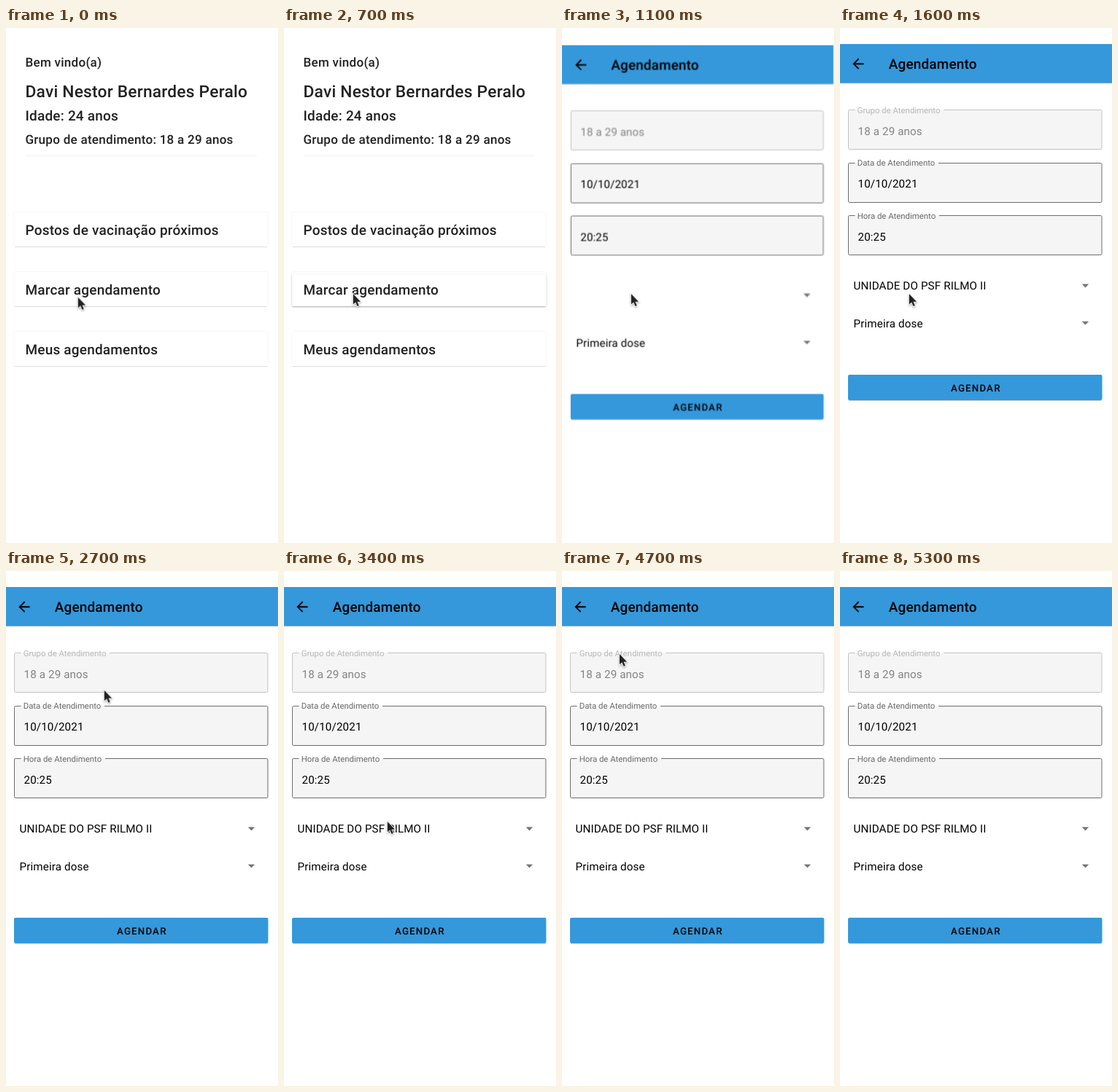
Write an HTML page that moves like this. It is 373x707 px and loops after 5.9 s.

```html
<!DOCTYPE html>
<html lang="pt">
<head>
<meta charset="utf-8">
<title>Agendamento</title>
<style>
  html, body { margin: 0; width: 100%; height: 100%; overflow: hidden; background: #fff; }
  svg { display: block; width: 373px; height: 707px; font-family: Roboto, sans-serif; text-rendering: geometricPrecision; }

  /* Every timeline shares the same loop and changes in hard steps. */
  .home, .form, .raised, .labels, .unit, .drop, .rest, .cursor { animation: 5.9s step-end infinite; }
  .home, .form { transform-origin: 185px 365px; }

  .home { fill: #222; font-weight: 500; letter-spacing: .2px; animation-name: home; }
  .t18 { font-size: 17.08px; letter-spacing: .24px; }
  .t20 { font-size: 18.98px; }
  .t24 { font-size: 22.78px; }
  .edge { fill: #fff; stroke: #f6f6f6; }
  .under { fill: none; stroke: #dedede; }
  .raised { fill: #fff; filter: drop-shadow(0 1.5px 1.5px rgba(0, 0, 0, .24)); animation-name: raised; }

  .form { font-size: 15.18px; letter-spacing: .13px; animation-name: form; }
  .bar { fill: #3498db; }
  .shade { fill: none; stroke: #000; stroke-opacity: .2; }
  .title { font-size: 18.98px; font-weight: 500; letter-spacing: .17px; }
  .box { fill: #f5f5f5; stroke: #6c6c6c; }
  .notch { stroke: #f5f5f5; stroke-width: 1.2; }
  .label { font-size: 11.39px; letter-spacing: 0; fill: #6c6c6c; }
  .off .box { stroke: #c2c2c2; }
  .off .label { fill: #b8b8b8; }
  .off .value { fill: #838383; }
  .arrow { fill: #757575; }
  .button { font-size: 13.28px; font-weight: 500; letter-spacing: 1.186px; }

  .labels { animation-name: labels; }
  .unit { animation-name: unit; }
  .drop { animation-name: drop; }
  .rest { animation-name: rest; }
  .cursor { animation-name: cursor; }
  .cursor path { fill: #222; stroke: #fff; stroke-width: 1.8; paint-order: stroke; filter: drop-shadow(0 1px .8px rgba(0, 0, 0, .35)); }

  @keyframes raised { 0% { opacity: 0 } 11.86%, 100% { opacity: 1 } }
  @keyframes home {
    0% { opacity: 1; transform: none }
    16.94% { opacity: .6; transform: scale(1.125) }
    18.64%, 100% { opacity: 0; transform: scale(1.125) }
  }
  @keyframes form {
    0% { opacity: 0; transform: scale(.972) }
    16.94% { opacity: .44; transform: scale(.972) }
    18.64% { opacity: 1; transform: scale(.9956) }
    20.33%, 100% { opacity: 1; transform: none }
  }
  @keyframes labels { 0% { opacity: 0 } 20.33% { opacity: .6 } 22.03%, 100% { opacity: 1 } }
  @keyframes unit { 0% { opacity: 0 } 27.11%, 100% { opacity: 1 } }
  @keyframes drop { 0% { transform: translateY(13px) } 27.11%, 100% { transform: none } }
  @keyframes rest { 0% { transform: translateY(27px) } 27.11%, 100% { transform: none } }

  /* The pointer is sampled ten times a second. */
  @keyframes cursor {
    0% { transform: translate(98.8px, 369.7px); opacity: 1 }
    1.69% { transform: translate(98.8px, 369.7px); animation-timing-function: steps(2, start) }
    5.08% { transform: translate(94.8px, 365px) }
    37.28% { transform: translate(94.8px, 365px); animation-timing-function: steps(3, start) }
    42.37% { transform: translate(123.8px, 233.5px) }
    45.76% { transform: translate(123.8px, 233.5px); animation-timing-function: steps(1, start) }
    47.45% { transform: translate(134.8px, 163.8px) }
    49.15% { transform: translate(134.8px, 163.8px); animation-timing-function: steps(6, start) }
    59.32% { transform: translate(141.8px, 344px); animation-timing-function: steps(2, start) }
    62.71% { transform: translate(141.8px, 378px) }
    64.4% { transform: translate(141.8px, 378px); animation-timing-function: steps(4, start) }
    71.18% { transform: translate(141.5px, 482px) }
    72.88% { transform: translate(141.5px, 482px); animation-timing-function: steps(6, start) }
    83.05% { transform: translate(66.3px, 40.3px); animation-timing-function: steps(2, start) }
    86.44% { transform: translate(42.3px, 40.3px); opacity: 1 }
    89.83%, 100% { transform: translate(42.3px, 40.3px); opacity: 0 }
  }
</style>
</head>
<body>
<svg viewBox="0 0 373 707">
  <defs>
    <clipPath id="window"><rect y="22" width="373" height="685"/></clipPath>
    <g id="card">
      <rect class="edge" x="10.5" y=".5" width="349" height="48" rx="2"/>
      <path class="under" d="M12 48.5H358"/>
    </g>
    <rect id="frame" x="11.5" y=".5" width="347.5" height="54" rx="1.8"/>
    <path id="caret" d="M-4.75-2.4h9.5L0 2.4Z"/>
  </defs>

  <g clip-path="url(#window)">
    <g class="home">
      <text class="t18" x="26.5" y="53">Bem vindo(a)</text>
      <text class="t24" x="26.5" y="95">Davi Nestor Bernardes Peralo</text>
      <text class="t20" x="26.5" y="127">Idade: 24 anos</text>
      <text class="t18" x="26.5" y="159">Grupo de atendimento: 18 a 29 anos</text>
      <rect x="27" y="175" width="317" height="1" fill="#f2f2f2"/>
      <use href="#card" y="252"/>
      <use href="#card" y="334"/>
      <rect class="raised" x="11" y="338" width="348.5" height="44" rx="2"/>
      <use href="#card" y="416"/>
      <g class="t20">
        <text x="26.5" y="284.3">Postos de vacinação próximos</text>
        <text x="26.5" y="366.3">Marcar agendamento</text>
        <text x="26.5" y="448.3">Meus agendamentos</text>
      </g>
    </g>

    <g class="form">
      <rect x="-20" y="22" width="410" height="720" fill="#fff"/>
      <rect class="bar" x="-2" y="22" width="375" height="53.5"/>
      <path class="shade" d="M-2 75.7H373"/>
      <path transform="translate(13.6 37.8) scale(.949)" d="M20 11H7.83l5.59-5.59L12 4l-8 8 8 8 1.41-1.41L7.83 13H20Z"/>
      <text class="title" x="66.7" y="56.3">Agendamento</text>

      <g class="off" transform="translate(0 112)">
        <use href="#frame" class="box"/>
        <g class="labels">
          <path class="notch" d="M20.5.5H142"/>
          <text class="label" x="23.7" y="4.7">Grupo de Atendimento</text>
        </g>
        <text class="value" x="24.5" y="34.7">18 a 29 anos</text>
      </g>
      <g transform="translate(0 185)">
        <use href="#frame" class="box"/>
        <g class="labels">
          <path class="notch" d="M20.5.5H135"/>
          <text class="label" x="23.7" y="4.3">Data de Atendimento</text>
        </g>
        <text class="value" x="24.5" y="34.3">10/10/2021</text>
      </g>
      <g transform="translate(0 257)">
        <use href="#frame" class="box"/>
        <g class="labels">
          <path class="notch" d="M20.5.5H136"/>
          <text class="label" x="23.7" y="4.8">Hora de Atendimento</text>
        </g>
        <text class="value" x="24.5" y="34.8">20:25</text>
      </g>

      <text class="unit" x="18.5" y="359.4">UNIDADE DO PSF RILMO II</text>
      <g class="drop"><use href="#caret" class="arrow" x="336.5" y="354"/></g>
      <g class="rest">
        <text x="18.5" y="410.5">Primeira dose</text>
        <use href="#caret" class="arrow" x="336.5" y="405.2"/>
        <path class="shade" d="M12 511.5H358.5"/>
        <rect class="bar" x="11" y="476" width="348.5" height="35" rx="2"/>
        <text class="button" x="152" y="498.8">AGENDAR</text>
      </g>
    </g>
  </g>

  <g class="cursor">
    <path d="M0 0V14.6l3.3-3.1 2.4 5.6 2.3-1-2.3-5.4h4.6Z"/>
  </g>
</svg>
</body>
</html>
```
